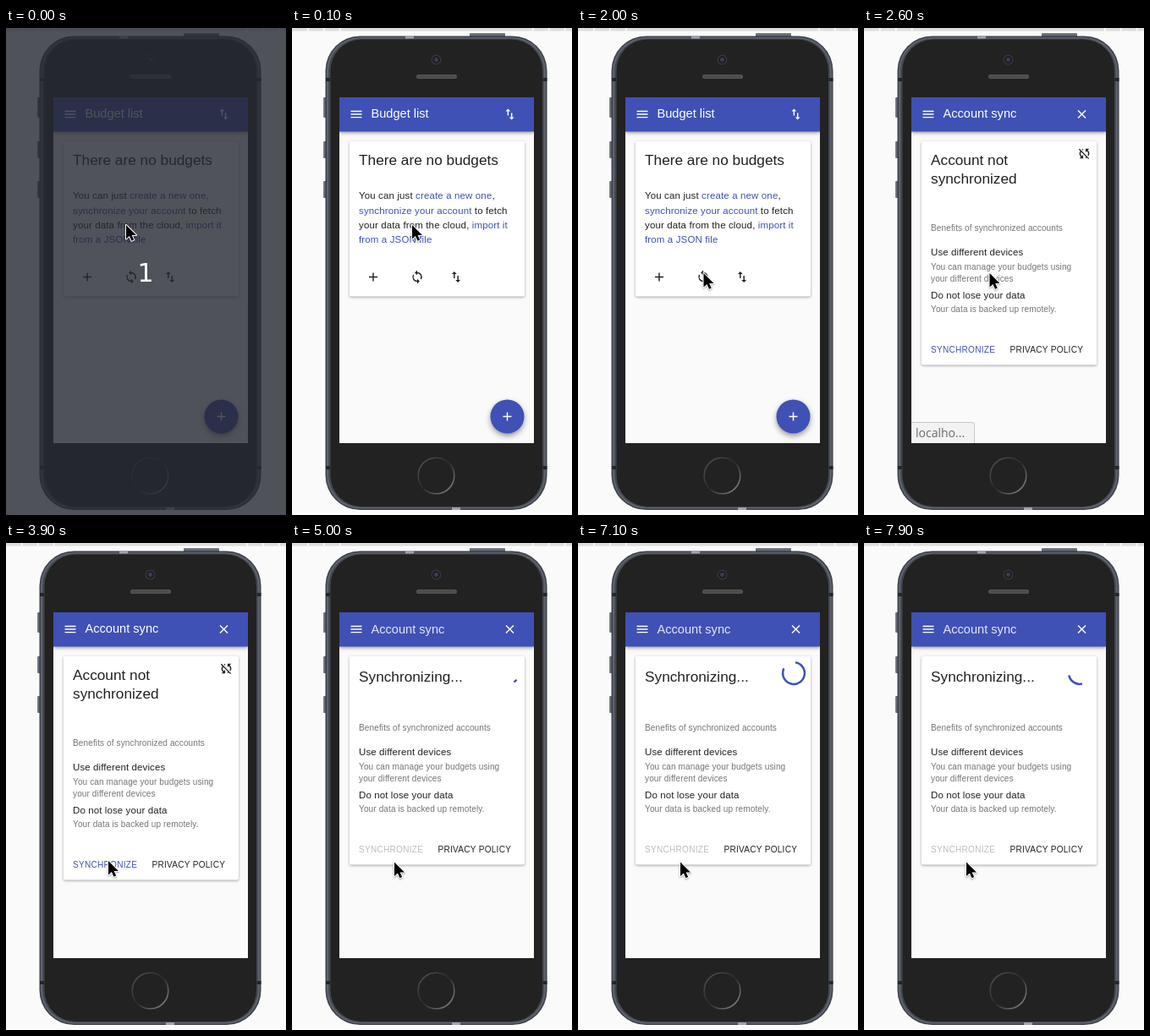
Write an HTML page with a canvas that moves like this. It is 331 px wide and 576 px high and loops after 8000 ms.

```html
<!DOCTYPE html>
<html lang="en">
<head>
<meta charset="utf-8">
<title>Budget app</title>
<style>
html, body { margin: 0; width: 100%; height: 100%; overflow: hidden; background: #fafafa; }
canvas { display: block; width: 331px; height: 576px; }
</style>
</head>
<body>
<canvas id="stage"></canvas>
<script>
const W = 331, H = 576, LOOP = 8000, TAU = Math.PI * 2;
const INDIGO = '#3f51b5', INK = '#212121', MUTED = '#757575';
const SANS = '"Liberation Sans", Arial, sans-serif';
const canvas = document.getElementById('stage');
const dpr = window.devicePixelRatio || 1;
canvas.width = W * dpr;
canvas.height = H * dpr;
const ctx = canvas.getContext('2d');
ctx.scale(dpr, dpr);

// Icons on a 24 unit grid
const ICONS = {
  menu: 'M3 18h18v-2H3zm0-5h18v-2H3zm0-7v2h18V6z',
  swap: 'M9 3L5 7h3v7h2V7h3zm7 14v-7h-2v7h-3l4 4 4-4z',
  add: 'M19 13h-6v6h-2v-6H5v-2h6V5h2v6h6z',
  close: 'M19 6.4L17.6 5 12 10.6 6.4 5 5 6.4 10.6 12 5 17.6 6.4 19 12 13.4 17.6 19 19 17.6 13.4 12z',
  sync: 'M12 4V1L8 5l4 4V6a6 6 0 0 1 5.3 8.8l1.46 1.46A8 8 0 0 0 12 4zm0 14A6 6 0 0 1 6.7 9.2L5.24 7.74A8 8 0 0 0 12 20v3l4-4-4-4z',
  syncOff: 'M10 6.35V4.26a8 8 0 0 0-2.23.96l1.46 1.46zM2.86 5.41l2.36 2.36A8 8 0 0 0 6.36 17.64L4 20h6v-6l-2.24 2.24A6 6 0 0 1 6.68 9.23l8.08 8.08-.77.34v2.09a8 8 0 0 0 2.23-.96l2.36 2.36 1.27-1.27L4.14 4.14zM20 4h-6v6l2.24-2.24A6 6 0 0 1 17.32 14.77l1.46 1.46A8 8 0 0 0 17.64 6.36z'
};
for (const name in ICONS) ICONS[name] = new Path2D(ICONS[name]);
const ARROW = new Path2D('M0 0V16.6L3.9 13 6.5 18.8 9.2 17.6 6.6 12H12Z');

// Pointer stops: time, x, y
const POINTER = [
  [0, 142, 233], [200, 150, 226], [300, 157, 219], [500, 164, 212], [800, 190, 212],
  [1000, 197, 211], [1300, 186, 232], [1400, 162, 290], [1500, 142, 335], [1600, 142, 314],
  [1800, 140, 311], [1900, 143, 300], [2000, 148.5, 290], [3400, 136, 330],
  [3500, 121, 379], [3600, 121, 377], [3900, 121, 376], [4000, 121, 377.5]
];

function icon(name, cx, cy, color, size = 17.25) {
  ctx.save();
  ctx.translate(cx - size / 2, cy - size / 2);
  ctx.scale(size / 24, size / 24);
  ctx.fillStyle = color;
  ctx.fill(ICONS[name]);
  ctx.restore();
}

function text(str, x, y, size, color = INK, spacing = 0, family = SANS) {
  ctx.font = `${size}px ${family}`;
  ctx.letterSpacing = spacing + 'px';
  ctx.fillStyle = color;
  ctx.fillText(str, x, y);
  const width = ctx.measureText(str).width;
  ctx.letterSpacing = '0px';
  return x + width;
}

function rect(x, y, w, h, color, r = 0) {
  ctx.fillStyle = color;
  ctx.beginPath();
  ctx.roundRect(x, y, w, h, r);
  ctx.fill();
}

function disc(x, y, r, color) {
  ctx.fillStyle = color;
  ctx.beginPath();
  ctx.arc(x, y, r, 0, TAU);
  ctx.fill();
}

function shadowed(dy, blur, alpha, draw) {
  ctx.save();
  ctx.shadowColor = `rgba(0,0,0,${alpha})`;
  ctx.shadowOffsetY = dy * dpr;
  ctx.shadowBlur = blur * dpr;
  draw();
  ctx.restore();
}

function gradient(x0, y0, x1, y1, ...colors) {
  const g = ctx.createLinearGradient(x0, y0, x1, y1);
  colors.forEach((c, i) => g.addColorStop(i / (colors.length - 1), c));
  return g;
}

function phone() {
  rect(0, 0, W, H, '#fafafa');
  rect(0, 0, W, 3.5, '#dedede');
  for (const x of [18, 37, 56, 284, 303, 322]) rect(x, 0, 1.5, 3.5, '#fff');

  rect(210, 6, 42, 6, gradient(0, 6, 0, 11, '#7a7f8a', '#4b505b'), 1);
  for (const [y, h] of [[82, 24], [134, 20], [181, 20]]) {
    rect(37, y, 5, h, gradient(37, 0, 41, 0, '#7c818c', '#4b505a'), 1);
  }
  rect(39.5, 9.5, 262, 560.5, '#3c4049', 41);
  rect(41, 11, 259, 557.5, '#5d626d', 39.5);
  rect(43.2, 12.5, 254.6, 554.5, '#42464f', 38);
  for (const y of [59, 518]) {
    rect(40, y, 5, 4, '#23252a');
    rect(296.5, y, 5, 4, '#23252a');
  }
  rect(134, 9.5, 10, 3, '#a0a3aa');
  rect(189, 567, 10, 3, '#a0a3aa');
  rect(45.5, 13.5, 250.5, 552.5, '#222', 37);

  disc(170.5, 37.5, 6, '#37373d');
  disc(170.5, 37.5, 4.6, '#1d1d24');
  disc(170.5, 37.5, 2.4, '#3b3e55');
  rect(147, 55, 48, 5, '#555', 2.5);
  for (let x = 149; x < 193; x += 2) rect(x, 56, 1, 3, '#434343');

  ctx.strokeStyle = gradient(155, 514, 186, 545, '#4a4a4a', '#2a2a2a', '#777');
  ctx.lineWidth = 1.6;
  ctx.beginPath();
  ctx.arc(170.5, 529.5, 21.3, 0, TAU);
  ctx.stroke();
}

function bar(title, action, shifted) {
  shadowed(1.5, 4, 0.4, () => rect(56, 82, 230, 40.5, INDIGO));
  icon('menu', 76, 102, '#fff');
  icon(action, 257.5, 102, '#fff');
  text(title, 93.5, shifted ? 107 : 106, 14.6, shifted ? '#e3e6f5' : '#fff');
}

function card(bottom) {
  shadowed(1, 3, 0.36, () => rect(68, 134, 207, bottom - 134, '#fff', 2));
}

function budgetPage() {
  bar('Budget list', 'swap');
  card(317.5);
  text('There are no budgets', 79, 162, 17.25);
  const body = (str, x, y, color) => text(str, x, y, 11.5, color, 0.13);
  let x = body('You can just ', 79, 202, INK);
  x = body('create a new one', x, 202, INDIGO);
  body(',', x, 202, INK);
  x = body('synchronize your account', 79, 220, INDIGO);
  body(' to fetch', x, 220, INK);
  x = body('your data from the cloud, ', 79, 237, INK);
  body('import it', x, 237, INDIGO);
  body('from a JSON file', 79, 254, INDIGO);
  icon('add', 96, 294.5, INK);
  icon('sync', 148, 294.5, INK);
  icon('swap', 194, 294.5, INK);
  shadowed(3, 6, 0.4, () => disc(254.5, 459.5, 20, INDIGO));
  icon('add', 254.5, 459.5, '#fff');
}

function accountPage(busy, t) {
  bar('Account sync', 'close', busy);
  const dy = busy ? -18 : 0;
  card(398.5 + dy);
  if (busy) {
    text('Synchronizing...', 79, 164, 17.25);
    spinner(t);
  } else {
    text('Account not', 79, 162, 17.25);
    text('synchronized', 79, 184, 17.25);
    icon('syncOff', 260.5, 148.5, INK);
  }
  const note = (str, y) => text(str, 79, y + dy, 10.07, MUTED, 0.1);
  const item = (str, y) => text(str, 79, y + dy, 11.5, INK, 0.1);
  note('Benefits of synchronized accounts', 240);
  item('Use different devices', 269);
  note('You can manage your budgets using', 286);
  note('your different devices', 300);
  item('Do not lose your data', 320);
  note('Your data is backed up remotely.', 336);
  text('SYNCHRONIZE', 79, 384 + dy, 10.07, busy ? '#bdbdbd' : INDIGO, 0.27);
  text('PRIVACY POLICY', 172.5, 384 + dy, 10.07, INK, 0.25);
}

const ease = u => u < 0.5 ? 2 * u * u : 1 - 2 * (1 - u) * (1 - u);

// Arc grows for half a cycle, then its tail catches up with the end of the circle
function spinner(t) {
  const full = 125.66;
  const p = (((t - 5039) / 1312) % 1 + 1) % 1;
  const e = ease(p * 2 % 1);
  const from = p < 0.5 ? 15 * e : 15 + 105 * e;
  const to = Math.min(full, from + (p < 0.5 ? 8 + 92 * e : 100));
  const turn = (54.6 + (t - 5000) * 0.2522) / 360;
  ctx.strokeStyle = INDIGO;
  ctx.lineWidth = 2.5;
  ctx.beginPath();
  ctx.arc(255, 154, 12.9, (turn + from / full) * TAU, (turn + to / full) * TAU);
  ctx.stroke();
}

function statusBubble(alpha) {
  ctx.save();
  ctx.globalAlpha = alpha;
  rect(56, 466, 75, 25, '#c8c8c8', [0, 4, 0, 0]);
  rect(56, 467, 74, 24, '#f2f2f2', [0, 3, 0, 0]);
  text('localho...', 61, 484, 14, '#6a6a6a', 0, '"Open Sans", "Noto Sans", sans-serif');
  ctx.restore();
}

function countdown() {
  rect(0, 0, W, H, 'rgba(37,40,48,0.8)');
  ctx.textAlign = 'center';
  text('1', 165, 299.5, 30, '#fff', 0, '"DejaVu Sans", sans-serif');
  ctx.textAlign = 'left';
}

function pointer(t) {
  const [, x, y] = POINTER.findLast(stop => stop[0] <= t);
  ctx.save();
  ctx.translate(x, y);
  shadowed(1, 2, 0.35, () => {
    ctx.strokeStyle = '#fff';
    ctx.lineWidth = 2;
    ctx.lineJoin = 'round';
    ctx.stroke(ARROW);
  });
  ctx.fillStyle = '#000';
  ctx.fill(ARROW);
  ctx.restore();
}

function draw(time) {
  const t = Math.floor(time / 100) * 100;
  phone();
  ctx.save();
  ctx.beginPath();
  ctx.rect(56, 82, 230, 409);
  ctx.clip();
  rect(56, 82, 230, 409, '#fafafa');
  if (t < 2400) budgetPage();
  else accountPage(t >= 4900, t);
  const bubble = Math.min((t - 2300) / 300, (3000 - t) / 300, 1);
  if (bubble > 0) statusBubble(bubble);
  ctx.restore();
  if (t < 100) countdown();
  pointer(t);
}

const start = performance.now();
function tick() {
  draw((performance.now() - start) % LOOP);
  requestAnimationFrame(tick);
}
tick();
</script>
</body>
</html>
```
